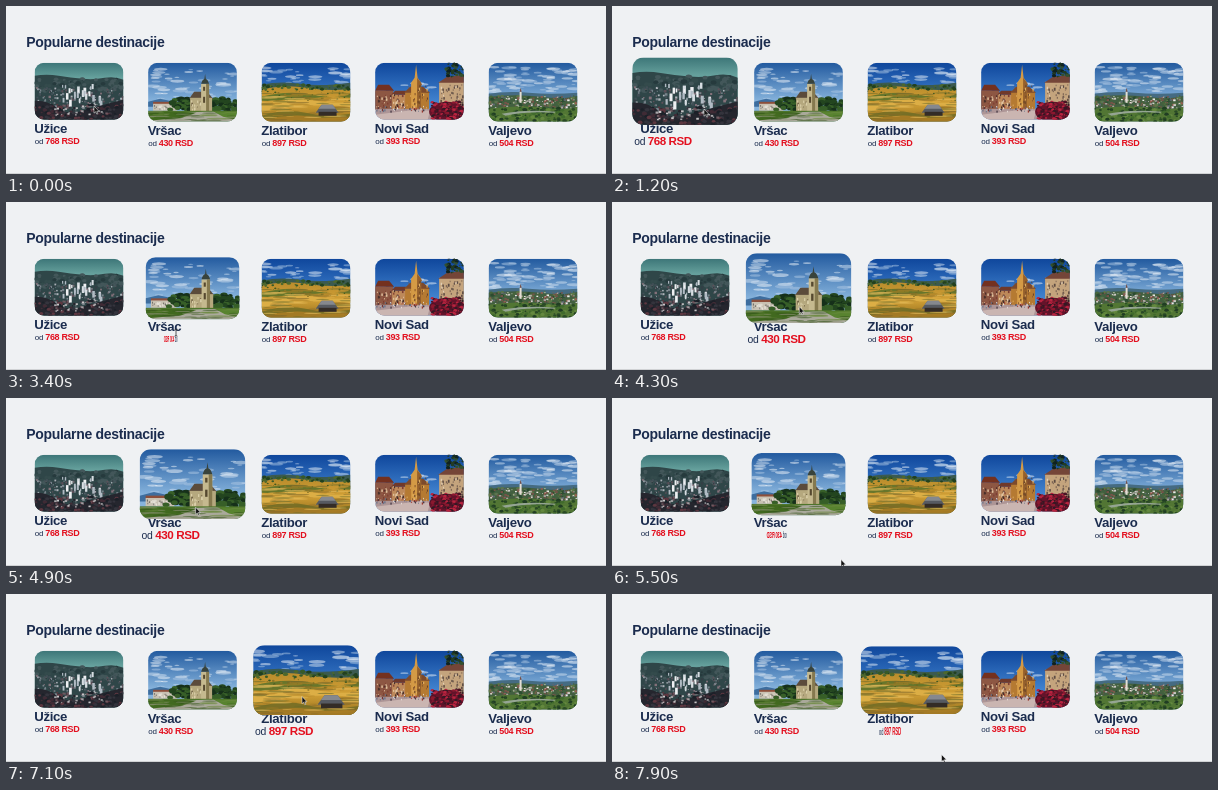
Recreate the animation shown at these times as an HTML page. Size 600 by 168 pixels, loop 8000 ms.

```html
<!DOCTYPE html>
<html lang="sr">
<head>
<meta charset="utf-8">
<title>Popularne destinacije</title>
<style>
html, body { margin: 0; width: 100%; height: 100%; overflow: hidden; background: #eff1f3; }
svg { display: block; }
text { font-family: "Liberation Sans", Arial, sans-serif; fill: #1b2c4e; }
.title { font-size: 14px; font-weight: bold; letter-spacing: -.31px; }
.name { font-size: 13.2px; font-weight: bold; letter-spacing: -.3px; }
.price { font-size: 8px; letter-spacing: -.2px; }
.price tspan { font-size: 9px; font-weight: bold; letter-spacing: -.34px; fill: #e3101f; }
</style>
</head>
<body>
<svg id="stage" width="600" height="168" viewBox="0 0 600 168">
  <defs>
    <linearGradient id="teal" x2="0" y2="1"><stop stop-color="#3d7678"/><stop offset=".25" stop-color="#65a09c"/></linearGradient>
    <linearGradient id="blue" x2="0" y2="1"><stop stop-color="#225a9f"/><stop offset=".65" stop-color="#86b3dc"/></linearGradient>
    <linearGradient id="deep" x2="0" y2="1"><stop stop-color="#0f479c"/><stop offset=".7" stop-color="#4486d2"/></linearGradient>
    <linearGradient id="gold" x2="0" y2="1"><stop stop-color="#b98c2c"/><stop offset=".5" stop-color="#d19f35"/><stop offset="1" stop-color="#94701f"/></linearGradient>
  </defs>
  <rect width="600" height="168" fill="#eff1f3"/>
  <rect y="167" width="600" height="1" fill="#d0d2d4"/>
  <text class="title" x="20.2" y="41.2">Popularne destinacije</text>
  <g id="cards"></g>
  <path id="arrow" d="M0 0V7.2L1.7 5.7 2.8 8.2 3.9 7.7 2.8 5.3H5Z" fill="#111" stroke="#fff" stroke-width=".5"/>
  <path id="beam" d="M-1.5-3.5Q0-3.5 0-2.5Q0-3.5 1.5-3.5M0-2.5V2.5M-1.5 3.5Q0 3.5 0 2.5Q0 3.5 1.5 3.5" fill="none" stroke="#333" stroke-width=".8"/>
</svg>
<script>
const LOOP = 8000, STEP = 100, FADE = 500, WIDTH = 88.7;
const $ = id => document.getElementById(id);

let seed = 7;
const rnd = () => (seed = seed * 16807 % 2147483647) / 2147483647;

// drawing helpers, all in a picture box of about 89 x 58
const path = (fill, d) => `<path fill="${fill}" d="${d}"/>`;
const box = (fill, x, y, w, h) => `<rect fill="${fill}" x="${x}" y="${y}" width="${w}" height="${h}"/>`;
const oval = (fill, x, y, rx, ry, o = 1) => `<ellipse fill="${fill}" opacity="${o}" cx="${x}" cy="${y}" rx="${rx}" ry="${ry}"/>`;
const sky = id => box(`url(#${id})`, 0, 0, 89, 59);

function scatter(n, [x, y, w, h], colors, draw) {
  let out = "";
  for (let i = 0; i < n; i++) {
    const c = colors[Math.floor(rnd() * colors.length)];
    out += draw(c, x + rnd() * w, y + h * (i + rnd()) / n, rnd());
  }
  return out;
}
const clouds = (n, area) => scatter(n, area, ["#f4f7fb", "#d5e3f1", "#adc8e4"],
  (c, x, y, k) => oval(c, x, y, 2 + 6 * k, .5 + 1.2 * k, .5));
const trees = (n, area, colors, size) => scatter(n, area, colors,
  (c, x, y, k) => oval(c, x, y, size * (.5 + k), size * (.4 + .7 * k)));
const houses = (n, area, colors, w, h) => scatter(n, area, colors,
  (c, x, y, k) => box(c, x, y, w * (.6 + k), h * (.5 + k)));
const streaks = (n, area, colors) => scatter(n, area, colors,
  (c, x, y, k) => oval(c, x, y, 3 + 9 * k, .3 + .5 * k, .6));

const green = ["#16301a", "#23451f", "#375f28"];
const art = [
  () => sky("teal")
    + path("#2f4648", "M0 13Q12 11 24 13T48 16T70 15T89 17V59H0Z")
    + trees(80, [0, 16, 89, 12], ["#263a3d", "#344b4c", "#43575a"], 2)
    + houses(190, [0, 24, 89, 20], ["#78838b", "#aeb4ba", "#5e5059", "#84717a", "#414f56", "#343e45"], 1.5, 1.6)
    + houses(26, [26, 21, 42, 17], ["#d7dde2", "#b1bbc4", "#eef0f2"], 1.8, 5)
    + path("#25262e", "M0 38Q12 37 22 45T48 48T89 37V59H0Z")
    + trees(160, [0, 42, 89, 16], ["#23242c", "#402b35", "#5d3740", "#1b2028", "#34343d"], 1.5)
    + houses(40, [18, 41, 54, 11], ["#a9a7aa", "#6f5960", "#c7c4c6"], 1.6, 1.3),
  () => sky("blue") + clouds(45, [0, 6, 89, 30])
    + path("#3d6d9e", "M0 39 12 36 26 39V44H0Z")
    + box("#8d4f3b", 5, 39, 24, 3) + box("#c9c2b3", 5, 41, 24, 7)
    + houses(24, [6, 42, 21, 4], ["#6f6b66", "#e6e2d8"], .8, 1.8)
    + trees(45, [22, 36, 22, 11], green, 2.6)
    + trees(50, [64, 36, 25, 12], green, 2.8)
    + path("#5b4b3b", "M41 36 46 29H59L65 36Z")
    + box("#b5a87e", 42, 35, 22, 15)
    + box("#c5b98f", 53, 21, 8, 29) + box("#85794f", 58, 21, 3, 29)
    + path("#38433c", "M53 21Q54 17 56.3 16L57 11 57.7 16Q60 17 61 21Z")
    + box("#55482f", 55, 24, 2, 4) + box("#55482f", 55, 34, 2, 6)
    + houses(14, [43, 37, 9, 9], ["#6d5e41", "#dacfa9"], 1, 2.5)
    + box("#4f752b", 0, 48, 89, 11)
    + path("#aaa99b", "M0 56Q30 49 57 49H65L89 53V59H0Z")
    + path("#41691f", "M0 50Q16 48 48 50L34 55 0 58Z")
    + path("#58832f", "M89 49 66 49 75 54 89 57Z")
    + streaks(40, [0, 49, 89, 9], ["#36571d", "#6d8a41", "#8d9175"]),
  () => sky("deep") + clouds(32, [0, 5, 89, 15])
    + path("#3b5a50", "M0 22Q18 18 38 21T89 20V34H0Z")
    + path("url(#gold)", "M0 27Q22 21 45 25T89 26V59H0Z")
    + trees(60, [0, 22, 89, 5], ["#22401f", "#375a28", "#4d682d"], 1.5)
    + path("#67762b", "M0 34Q26 27 52 32T89 31V35Q66 33 46 36T0 38Z")
    + path("#dcae45", "M0 42Q28 34 54 38T89 38V44Q48 39 0 49Z")
    + path("#7b7025", "M0 53Q24 45 44 50T89 51V59H0Z")
    + trees(50, [0, 28, 89, 10], ["#43591f", "#6d6b24", "#8b7628"], .8)
    + path("#a37a25", "M0 57Q30 50 60 55L89 54V59H0Z")
    + streaks(90, [0, 30, 89, 28], ["#81682a", "#e4bb5a", "#aa7f25", "#6b6c2b"])
    + path("#565a61", "M54 50 60 42H71L77 50Z") + path("#85888e", "M60 42H71L74 46H57Z")
    + box("#332c26", 57, 49, 18, 4),
  () => sky("deep") + clouds(10, [0, 20, 60, 12])
    + box("#8d5743", 0, 28, 18, 19) + path("#74311f", "M0 28 3 22H14L19 28Z")
    + box("#bd895a", 17, 32, 14, 15) + path("#70392a", "M16 32 20 28H31V32Z")
    + box("#c4a47d", 64, 19, 25, 28) + path("#744538", "M63 20 72 14 89 12V20Z")
    + houses(50, [1, 31, 28, 13], ["#4a302b", "#e2c5a2", "#7e3d31"], 1, 1.8)
    + houses(45, [65, 21, 23, 22], ["#5c4b43", "#7c6455", "#e0cdb2"], 1.1, 2)
    + box("#b57a32", 30, 29, 24, 19) + path("#7d4a2b", "M29 30 35 24H48L55 30Z")
    + path("#d49a45", "M36 48V20L39.5 15 41 2 42.5 15 46 20V48Z")
    + path("#95602c", "M42 48V15L46 20V48Z")
    + houses(34, [31, 20, 21, 25], ["#6b4528", "#e2b267", "#8b592e"], .9, 2)
    + box("#ad9596", 0, 46, 89, 13)
    + path("#cab5b1", "M0 52 40 47 55 48 52 59H0Z")
    + houses(55, [0, 43, 52, 5], ["#3b303c", "#98382f", "#e6e0dc", "#657087"], .8, 1.5)
    + trees(45, [71, -1, 20, 15], ["#10221f", "#213b25", "#33502f"], 1.6)
    + oval("#64132a", 72, 49, 18, 10)
    + trees(130, [56, 39, 32, 18], ["#4c1225", "#8c182f", "#b92440", "#331823"], 1.4),
  () => sky("blue") + clouds(65, [0, 4, 89, 25])
    + path("#456b82", "M0 31Q18 28 40 30T89 30V40H0Z")
    + path("#425f40", "M0 34Q28 31 52 34T89 33V59H0Z")
    + trees(65, [0, 33, 89, 11], ["#2c4b30", "#47653b", "#5c7747"], 1.6)
    + houses(140, [0, 33, 89, 12], ["#cfccc8", "#aaa39f", "#945d51", "#edece8", "#775349", "#5e6870"], 1.6, 1.3)
    + box("#e4dfd5", 31, 29, 2, 11) + path("#744d44", "M31 29 32 25 33 29Z")
    + path("#527634", "M0 46Q28 42 54 45T89 44V59H0Z")
    + trees(130, [0, 45, 89, 14], ["#294a25", "#406b2c", "#64893f", "#203d23"], 1.7)
    + path("#95a593", "M13 51Q37 46 67 49L66 50Q38 48 17 53Z")
];

// name, price, picture height, times at which the pointer enters and leaves
const places = [
  ["Užice", 768, 56.7, [0, 400, 785, 2325]],
  ["Vršac", 430, 58.7, [3300, 5300]],
  ["Zlatibor", 897, 58.7, [6300, 7825]],
  ["Novi Sad", 393, 56.7, []],
  ["Valjevo", 504, 58.7, []]
];

$("cards").innerHTML = places.map(([name, cost, h], i) => {
  const x = 28.6 + 113.5 * i;
  return `<clipPath id="frame${i}"><rect width="${WIDTH}" height="${h}" rx="9.5"/></clipPath>
    <text class="name" x="${x - .4}" y="${70.3 + h}">${name}</text>
    <g transform="translate(${x} 56.8)"><g id="pic${i}"><g clip-path="url(#frame${i})">${art[i]()}</g></g></g>
    <g transform="translate(${x + 22.5} ${78 + h})"><g id="cost${i}">
      <text class="price" x="-22.4" y="3.1">od <tspan>${cost} RSD</tspan></text></g></g>`;
}).join("");

// cubic-bezier(.25, .1, .25, 1)
function ease(x) {
  if (x >= 1) return 1;
  let lo = 0, hi = 1, s;
  for (let i = 0; i < 24; i++) {
    s = (lo + hi) / 2;
    if (.75 * s * (1 - s) + s ** 3 < x) lo = s; else hi = s;
  }
  return .3 * s * (1 - s) ** 2 + 3 * s * s * (1 - s) + s ** 3;
}

function hover(toggles, t) {
  let v = 0;
  toggles.forEach((start, i) => {
    if (t <= start) return;
    const goal = 1 - i % 2, end = Math.min(t, toggles[i + 1] ?? t);
    const gap = goal - v;
    if (gap) v += gap * ease((end - start) / (FADE * Math.abs(gap)));
  });
  return v;
}

// pointer: time, x, y
const route = [
  [0, 88, 100], [400, 84, 141], [600, 85, 146], [785, 88, 141], [1200, 92, 103],
  [2000, 95, 110], [2325, 112, 141], [2400, 117, 149.5], [2700, 125, 156], [3000, 140, 153],
  [3300, 165, 141], [3700, 185, 100], [5000, 190, 110], [5300, 218, 143], [5500, 229, 161.5],
  [5900, 250, 160], [6300, 273, 139], [6700, 292, 100], [7500, 300, 105], [7825, 322, 143],
  [7900, 329.5, 160.5], [8000, 332, 162]
];

function pointer(t) {
  const i = route.findIndex(k => k[0] > t);
  const [t0, x0, y0] = route[i - 1], [t1, x1, y1] = route[i];
  const k = (t - t0) / (t1 - t0);
  return [x0 + (x1 - x0) * k, y0 + (y1 - y0) * k];
}

function draw(now) {
  const t = Math.floor(now % LOOP / STEP) * STEP;
  places.forEach(([, , h, toggles], i) => {
    const p = hover(toggles, t), s = 1 + .19 * p, z = 1 + .3 * p;
    $("pic" + i).setAttribute("transform", `translate(${WIDTH / 2 * (1 - s)} ${h / 2 * (1 - s)}) scale(${s})`);
    $("cost" + i).setAttribute("transform", `scale(${z * Math.cos(2 * Math.PI * p)} ${z})`);
  });
  const [x, y] = pointer(t), onText = y > 122 && y <= 140;
  for (const id of ["arrow", "beam"]) {
    $(id).setAttribute("transform", `translate(${x} ${y})`);
    $(id).setAttribute("visibility", (id === "beam") === onText ? "visible" : "hidden");
  }
}

const begin = performance.now();
function tick() {
  draw(performance.now() - begin);
  requestAnimationFrame(tick);
}
tick();
</script>
</body>
</html>
```
